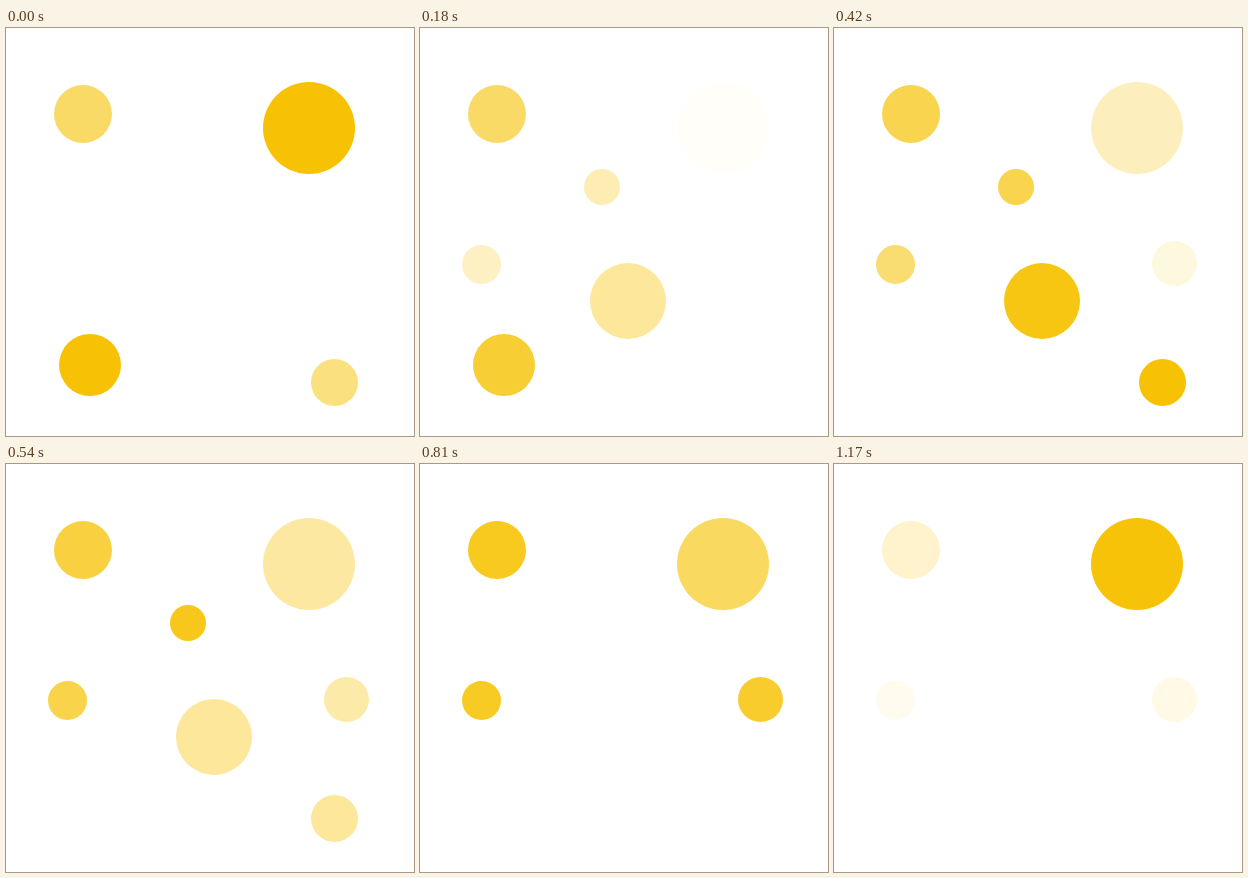
An HTML page for the animation above (1.2 s loop, 408x408 px).

```html
<!DOCTYPE html>
<html lang="en">
<head>
<meta charset="utf-8">
<title>Blinking dots</title>
<style>
  html, body { margin: 0; width: 100%; height: 100%; overflow: hidden; background: #fff; }
  svg { display: block; width: 100%; height: 100%; }
</style>
</head>
<body>
<svg viewBox="0 0 408 408" fill="#f7c203"></svg>
<script>
const LOOP = 1200, STEP = 30;

// Each dot: centre, radius and [time in ms, opacity] keys with linear fades between.
const dots = [
  { x: 77, y: 86, r: 29, keys: [[0, .6], [210, .6], [1050, 1], [1200, 0]] },
  { x: 303, y: 100, r: 46, keys: [[0, 1], [150, 0], [1200, 1]] },
  { x: 182, y: 159, r: 18, keys: [[0, 0], [600, 1], [750, 0]] },
  { x: 61.5, y: 236.5, r: 19.5, keys: [[0, 0], [750, 1], [1200, 0]] },
  { x: 340.5, y: 235.5, r: 22.5, keys: [[350, 0], [900, 1], [1200, 0]] },
  { x: 208, y: 273, r: 38, keys: [[0, 0], [450, 1], [600, 0]] },
  { x: 84, y: 337, r: 31, keys: [[0, 1], [150, 1], [300, 0]] },
  { x: 328.5, y: 354.5, r: 23.5, keys: [[0, .5], [150, 0], [180, 0], [330, 1], [450, 1], [600, 0]] },
];

const svg = document.querySelector("svg");
for (const dot of dots) {
  dot.node = document.createElementNS(svg.namespaceURI, "circle");
  dot.node.setAttribute("cx", dot.x);
  dot.node.setAttribute("cy", dot.y);
  dot.node.setAttribute("r", dot.r);
  svg.append(dot.node);
}

function opacityAt(keys, time) {
  const next = keys.findIndex(([t]) => t > time);
  if (next < 0) return keys[keys.length - 1][1];
  if (next === 0) return keys[0][1];
  const [t0, a] = keys[next - 1], [t1, b] = keys[next];
  return a + (b - a) * (time - t0) / (t1 - t0);
}

function draw() {
  const time = Math.floor(performance.now() % LOOP / STEP) * STEP;
  for (const { node, keys } of dots) node.setAttribute("opacity", opacityAt(keys, time));
  requestAnimationFrame(draw);
}
draw();
</script>
</body>
</html>
```
